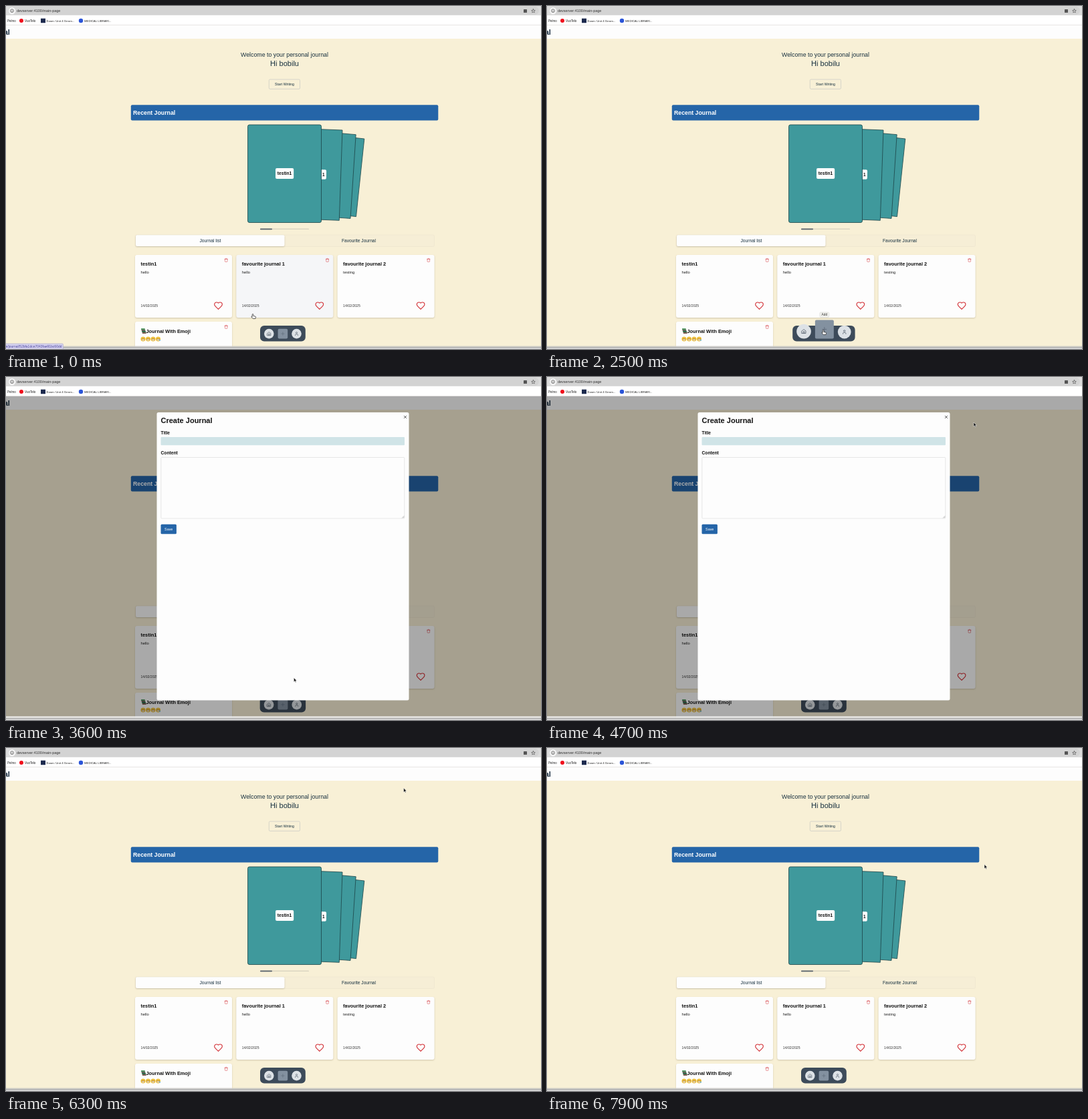
Animation of 800x514 px, one loop 8 s. Source, as an HTML page:

```html
<!DOCTYPE html>
<html lang="en">
<head>
<meta charset="utf-8">
<title>Journal</title>
<style>
  html, body { margin: 0; width: 100%; height: 100%; overflow: hidden; background: #f8f0d6; }
  svg { display: block; width: 800px; height: 514px; }
  text { font-family: "Liberation Sans", Arial, sans-serif; white-space: pre; }
  .shadow { filter: drop-shadow(0 1px 1.2px rgba(90, 80, 50, .25)); }
</style>
</head>
<body>
<svg id="stage" viewBox="0 0 800 514"></svg>
<script>
const NAVY = '#17303f', BLUE = '#2565a8', WHITE = '#fdfdfd', RED = '#d3343a', TEAL = '#3f999c';
const stage = document.getElementById('stage');

const rect = (x, y, w, h, fill, r = 0, extra = '') =>
  `<rect x="${x}" y="${y}" width="${w}" height="${h}" rx="${r}" fill="${fill}" ${extra}/>`;
const disc = (x, y, r, fill, extra = '') => `<circle cx="${x}" cy="${y}" r="${r}" fill="${fill}" ${extra}/>`;
const line = (d, stroke, width) =>
  `<path d="${d}" fill="none" stroke="${stroke}" stroke-width="${width}" stroke-linecap="round" stroke-linejoin="round"/>`;
// y is the middle of the capitals
const label = (x, y, str, size, fill = NAVY, extra = '') =>
  `<text x="${x}" y="${y + size * .355}" font-size="${size}" fill="${fill}" ${extra}>${str}</text>`;
const BOLD = 'font-weight="700"', MID = 'text-anchor="middle"', END = 'text-anchor="end"';
const outline = (color, width = .7) => `stroke="${color}" stroke-width="${width}"`;
const icon = (x, y, scale, body) =>
  `<g transform="translate(${x} ${y}) scale(${scale}) translate(-12 -12)">${body}</g>`;

const INK = '#3c4856';
const HEART = line('M19 14c1.5-1.5 3-3.2 3-5.5A5.5 5.5 0 0 0 16.5 3c-1.8 0-3 .5-4.5 2-1.5-1.5-2.7-2-4.5-2A5.5 5.5 0 0 0 2 8.5c0 2.3 1.5 4 3 5.5l7 7Z', RED, 2);
const TRASH = line('M3 6H21M19 6V20q0 2-2 2H7q-2 0-2-2V6M8 6V4q0-2 2-2h4q2 0 2 2V6', RED, 2);
const HOUSE = line('M3 10 12 3l9 7V21H3ZM9 21V13h6v8', INK, 2);
const PERSON = line('M19 21v-2a4 4 0 0 0-4-4H9a4 4 0 0 0-4 4v2', INK, 2) + disc(12, 7, 4, 'none', outline(INK, 2));
const PLUS = line('M4 12H20M12 4V20', '#5a6776', 2);

function browserBar() {
  return rect(0, 0, 800, 14, '#dcdcdc') + rect(3, 1, 794, 12, '#d3d3d3', 6) +
    disc(9, 7.2, 5.2, '#f4f4f4') + disc(9, 7.2, 2.4, 'none', outline('#444')) +
    line('M9 7v1.2', '#444', .7) +
    label(16, 7.2, 'devserver:4100/main-page', 5.5, '#333') +
    rect(774, 5, 5, 5, '#555', .5) +
    line('M788.5 4.6l.8 1.8 2 .2-1.5 1.3.4 2-1.7-1-1.7 1 .4-2-1.5-1.3 2-.2Z', '#444', .6) +
    rect(0, 14, 800, 14.5, '#fff') +
    label(2, 22, 'Pelmo', 4.5, '#222') +
    disc(23, 22, 3, '#f00f1c') + label(28, 22, 'VuoTelo', 4.6, '#222') +
    rect(52, 18.7, 7, 6.6, '#1c2a4e') + label(60.5, 22, 'Exam: Unit 4 Geom...', 4.4, '#222') +
    disc(112, 22, 3.2, '#2b55d8') + label(117, 22, 'MEDICAL LIBRARI...', 4.3, '#222') +
    rect(0, 28, 800, .7, '#dedede');
}

const backCard = path =>
  `<path d="M${path}Z" fill="${TEAL}" ${outline('#1d4548', .8)} stroke-linejoin="round"/>`;

function carousel() {
  return backCard('500 195 L535.8 199 523.5 315.6 500 313') +
    backCard('480 189 L523.2 192.7 515 318.4 480 316') +
    backCard('440 183.5 L503 186 498.3 321.3 440 319') +
    rect(440, 245, 39, 14.5, WHITE, 2, 'transform="rotate(1 460 252)"') +
    label(473, 252.4, '1', 6.3, '#111', BOLD) +
    rect(361.5, 178, 110, 146.5, TEAL, 2.5, outline('#1d4548', .8)) +
    rect(403, 243, 27.2, 16, WHITE, 2) +
    label(416.5, 251, 'testin1', 6.6, '#111', BOLD + MID) +
    rect(380, 333.6, 73, 1.5, '#dcd6c2', .7) + rect(380, 333.5, 18, 1.7, '#56606b', .8);
}

function journal([title, body], i) {
  const x = 193 + i * 151.3;
  return rect(x, 373, 145, 94, WHITE, 3, 'class="shadow card"') +
    label(x + 8.5, 386.8, title, 7.4, '#111', BOLD) +
    label(x + 8.5, 399, body, 5.8, '#222') +
    label(x + 8.5, 449.2, '14/02/2025', 5.15, '#333') +
    icon(x + 136.2, 380.8, .25, TRASH) + icon(x + 124.5, 449.2, .58, HEART);
}

function smiley(_, i) {
  const x = 205 + i * 7.5, y = 499;
  return disc(x, y, 3.6, '#f7cb45') + line(`M${x - 2} ${y - 1}h1.2M${x + .8} ${y - 1}h1.2`, '#8a5a22', .6) +
    `<path d="M${x - 2.1} ${y + .4}h4.2a2.1 2 0 0 1-4.2 0" fill="#fff" ${outline('#8a5a22', .4)}/>`;
}

function emojiCard() {
  const books = ['#3f8a50', '#57524a', '#2f6e4c', '#7a5a4f']
    .map((color, i) => rect(202 + i * .6, 483.3 + i * 1.9, 5.8, 1.9, color, .5)).join('');
  return rect(193, 473, 145, 50, WHITE, 3, 'class="shadow"') + books +
    label(209.5, 487, 'Journal With Emoji', 7.35, '#111', BOLD) +
    Array.from({ length: 4 }, smiley).join('') +
    disc(230, 500.7, 1, '#63b7e8') + icon(329.2, 480.8, .25, TRASH);
}

function page() {
  return rect(0, 28, 800, 486, '#f8f0d6') + rect(0, 28.5, 800, 20.5, WHITE) +
    label(5.8, 39.2, 'al', 11, '#14283c', BOLD + END) +
    label(416.5, 72.6, 'Welcome to your personal journal', 8.8, NAVY, MID) +
    label(416.5, 85.6, 'Hi bobilu', 11.05, NAVY, MID) +
    rect(393.3, 110, 46.2, 14.4, 'none', 1.5, outline('#cfcfc6', .8)) +
    label(416.5, 117.2, 'Start Writing', 5.25, NAVY, MID) +
    rect(186.8, 148.2, 459.5, 23.2, BLUE, 2) +
    label(190, 159.8, 'Recent Journal', 8.75, '#fff', BOLD) +
    carousel() +
    rect(193.5, 343, 447, 17.5, '#f6eed6', 2, outline('#eee6cf')) +
    rect(194, 343.3, 222.5, 16.8, WHITE, 2, 'class="shadow"') +
    label(305.5, 351.7, 'Journal list', 6.7, NAVY, MID) +
    label(527.5, 351.7, 'Favourite Journal', 6.6, NAVY, MID) +
    [['testin1', 'hello'], ['favourite journal 1', 'hello'], ['favourite journal 2', 'testing']].map(journal).join('') +
    emojiCard();
}

function modal() {
  return rect(0, 28.5, 800, 481, '#000', 0, 'opacity=".335"') +
    rect(0, 508.6, 800, 1.6, '#f4f4f4') +
    rect(225.5, 53, 377, 431.5, WHITE, 2.5) +
    label(231.5, 65.5, 'Create Journal', 11, '#111', BOLD) +
    line('M595.2 58.2l3.6 3.6M598.8 58.2l-3.6 3.6', '#444', .8) +
    label(231.5, 83.2, 'Title', 6.6, '#111', BOLD) +
    rect(231.5, 90, 364.5, 12.2, '#d0e4e7', 1) +
    label(231.5, 113.4, 'Content', 6.7, '#111', BOLD) +
    rect(231.8, 120.5, 364, 91.5, WHITE, 1, outline('#dedede')) +
    line('M592.5 211l2.5-2.5M594.2 211l.8-.8', '#777', .5) +
    rect(231.5, 220.7, 23.4, 14.6, BLUE, 1.5) + label(243.2, 228, 'Save', 5.4, '#fff', MID);
}

const statusBar = rect(-2, 506, 87.5, 9, '#d5d2ee', 1.5, outline('#aaa6cc', .6)) +
  label(83.5, 510.2, 'e/journal/52bfa1dce7043fae91bc60dd', 5, '#4a43a0', END);

stage.innerHTML = page() + `<g id="dock"></g>` +
  rect(0, 509.5, 800, 1, '#d4d2cc') + rect(0, 510.4, 800, 2.6, '#b9b9b9') + rect(0, 513, 800, 1, '#e6e6e6') +
  `<g id="modal">${modal()}</g>${browserBar()}<g id="status">${statusBar}</g>` +
  `<path id="arrow" d="M0 0V6.2L1.5 4.9 2.5 7 3.5 6.5 2.5 4.5H4.4Z" fill="#111" ${outline('#fff', .5)}/>` +
  `<path id="hand" d="M1.5 0q.9 0 .9 1v2l3 .7q.8.2.6 1L5.5 7H1.8L-.6 4.4q-.2-.9.6-.8l.7.6V1q0-1 .8-1Z" fill="#fff" ${outline('#222')}/>`;

const [dock, modalBox, status, arrow, hand] =
  ['dock', 'modal', 'status', 'arrow', 'hand'].map(id => document.getElementById(id));
const hoverCard = document.querySelectorAll('.card')[1];

const OPEN = 2600, CLOSE = 6300, LAG = 200;
// pointer stops: [time, x, y]
const PATH = [[0, 367.5, 461.5], [500, 412, 487], [900, 436, 489], [1200, 453.5, 490], [1900, 415, 487],
  [2300, 411.5, 485.5], [3500, 411.5, 485.5], [4700, 638, 68], [5500, 638, 68], [6100, 594.6, 60],
  [6400, 594.6, 60], [7800, 654, 174.5]];
const ITEMS = [['Home', HOUSE], ['Add', PLUS], ['Profile', PERSON]];
const REST = 14.6, GROWTH = 14.3, GAP = 6, MIDDLE = 413.9;

const clamp = v => Math.max(0, Math.min(1, v));
const itemX = i => MIDDLE + (i - 1) * (REST + GAP);

function pointer(t) {
  const i = PATH.findIndex(stop => stop[0] > t);
  if (i < 0) return PATH[PATH.length - 1].slice(1);
  const [t0, x0, y0] = PATH[i - 1], [t1, x1, y1] = PATH[i], p = (t - t0) / (t1 - t0);
  return [x0 + (x1 - x0) * p, y0 + (y1 - y0) * p];
}

// Items swell near the pointer, a moment late, and settle once the dialog opens.
function drawDock(t) {
  const [px, py] = pointer(Math.max(0, t - LAG));
  const near = clamp((py - 468) / 12) * Math.min(1, Math.exp((OPEN - 100 - t) / 300));
  const reach = ITEMS.map((_, i) => Math.abs(px - itemX(i)));
  const sizes = reach.map(d => REST + GROWTH * near * clamp(1 - d / 36));
  const width = sizes.reduce((sum, s) => sum + s) + GAP * 4;
  let x = MIDDLE - width / 2;
  let out = rect(x, 479, width, 23.4, '#3d4b5a', 6);
  x += GAP;
  ITEMS.forEach(([name, glyph], i) => {
    const s = sizes[i], top = 498.4 - s, cx = x + s / 2, cy = top + s / 2;
    const tip = near * clamp((11 - reach[i]) / 8), w = name.length * 2.3 + 7;
    out += name === 'Add' ? rect(x, top, s, s, '#8391a0', 2) : disc(cx, cy, s / 2, '#dde2e6');
    out += icon(cx, cy, (5.6 + (s - REST) * .14) / 20, glyph);
    out += `<g opacity="${tip}">` + rect(cx - w / 2, top - 11.5, w, 7.4, '#f1f1ee', 1.5, outline('#d5d5d0', .5)) +
      label(cx, top - 7.8, name, 4.8, '#333', MID) + '</g>';
    x += s + GAP;
  });
  dock.innerHTML = out;
}

const show = (el, on) => el.setAttribute('visibility', on ? 'visible' : 'hidden');

function frame(now) {
  const t = Math.floor(now % 8000 / 100) * 100;
  const open = t >= OPEN && t < CLOSE;
  const [x, y] = pointer(t);
  const onCard = !open && y > 373 && y < 467;
  const onItem = !open && y > 480 && ITEMS.some((_, i) => Math.abs(x - itemX(i)) < 12);
  drawDock(t);
  show(modalBox, open);
  show(status, onCard);
  show(hand, onCard || onItem);
  show(arrow, !onCard && !onItem);
  hoverCard.setAttribute('fill', onCard ? '#f5f6f8' : WHITE);
  for (const el of [arrow, hand]) el.setAttribute('transform', `translate(${x} ${y})`);
  requestAnimationFrame(frame);
}
requestAnimationFrame(frame);
</script>
</body>
</html>
```
